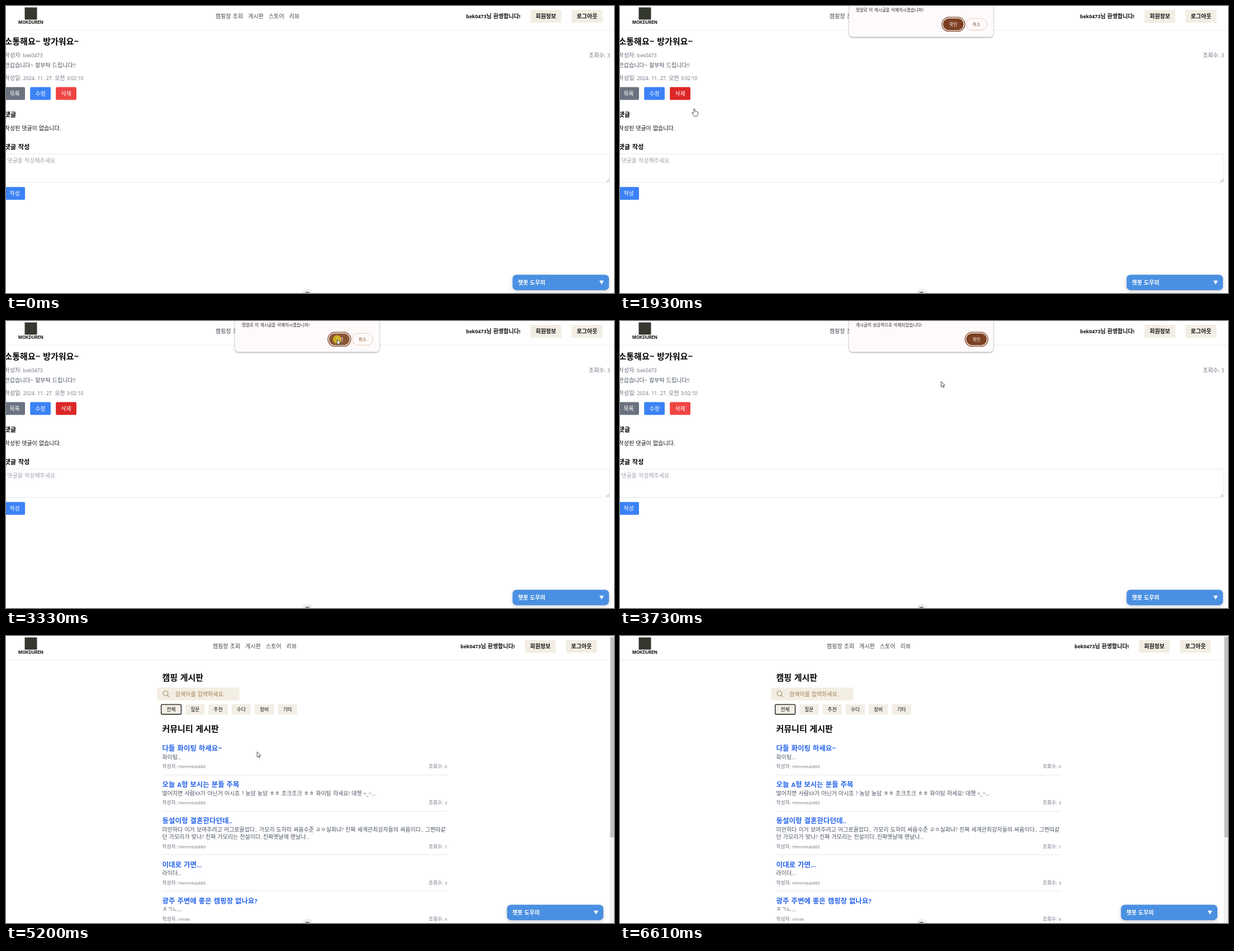
These frames come from a looping animation (1088x515 px, 7.4 s). An HTML page:

```html
<!DOCTYPE html>
<html lang="ko">
<head>
<meta charset="utf-8">
<title>캠핑 게시판</title>
<style>
html, body { margin: 0; width: 100%; height: 100%; overflow: hidden; background: #fff; }
svg { display: block; width: 1088px; height: 515px; }
text { font-family: 'Noto Sans CJK KR', 'Noto Sans CJK JP', sans-serif; word-spacing: .03em; white-space: pre; }
tspan { font-family: 'Open Sans', 'Noto Sans', sans-serif; font-size: .88em; }
.b { font-weight: 700; }
.m { text-anchor: middle; }
.e { text-anchor: end; }
.logo { font: 700 7.6px Inter, sans-serif; }
.card { filter: drop-shadow(0 1px 1.5px rgba(0, 0, 0, .4)); }
.chat { filter: drop-shadow(0 2px 3px rgba(0, 0, 0, .2)); }
</style>
</head>
<body>
<svg id="stage" viewBox="0 0 1088 515"></svg>
<script>
const DURATION = 7400;
const USER = 'bek0473', WRITER = 'hhmmtub683';
const INK = '#111', BODY = '#4b5563', MUTED = '#6b7280', SAND = '#f3eee4', BLUE = '#3b82f6';
const BROWN = '#7d4022', BROWN_HOVER = '#8b5636';
const LEFT = -2.5, RIGHT = 1081, COLUMN = 279.5, COLUMN_END = 789.5;

// cy is the vertical middle of the line; Latin runs get their own face.
const text = (x, cy, s, size = 10, fill = INK, cls = '') =>
  `<text x="${x}" y="${cy + size * .37}" font-size="${size}" fill="${fill}" class="${cls}">` +
  s.replace(/[!-}]+/g, '<tspan>$&</tspan>') + '</text>';
const heading = (x, cy, s, size = 15, fill = '#000') => text(x, cy, s, size, fill, 'b');
const rect = (x, y, w, h, fill, r = 0, extra = '') =>
  `<rect x="${x}" y="${y}" width="${w}" height="${h}" rx="${r}" fill="${fill}" ${extra}/>`;
const line = (x1, x2, y, color) => `<path d="M${x1} ${y}H${x2}" stroke="${color}"/>`;
const button = (col, y, label, fill, id = 'b' + y + col) => {
  const x = LEFT - .3 + col * 46;
  return rect(x, y, 36.8, 23, fill, 2, `id="${id}"`) + text(x + 18.4, y + 11.5, label, 10, '#fff', 'm');
};

// The scrollbar narrows the layout: centred parts move by half of it.
function frame(bar) {
  const end = 1088 - bar;
  return line(0, end, 43.5, '#efefef') +
    rect(33.5, 2.5, 22, 22, '#34382f') +
    '<text x="44.5" y="31.5" class="logo m" fill="#111">MOKDUREN</text>' +
    text(375 - bar / 2, 18.5, '캠핑장 조회', 10, '#3f444c') +
    ['게시판', '스토어', '리뷰'].map((s, i) =>
      text(433.3 + 36.7 * i - bar / 2, 18.5, s, 10, '#3f444c')).join('') +
    text(end - 167.5, 18.5, USER + '님 환영합니다!', 10, INK, 'b e') +
    ['회원정보', '로그아웃'].map((s, i) => {
      const x = end - 149.5 + i * 73.6;
      return rect(x, 7, 55.2, 23, SAND, 1) + text(x + 27.6, 18.5, s, 10, INK, 'b m');
    }).join('') +
    rect(end - 181.5, 482.3, 172.5, 27.6, '#4a90e2', 7, 'class="chat"') +
    heading(end - 172, 496, '챗봇 도우미', 10, '#fff') +
    `<path d="M${end - 26.2} 492.8h8l-4 7z" fill="#fff"/>`;
}

function detailPage() {
  return frame(0) +
    heading(LEFT, 63, '소통해요~ 방가워요~') +
    text(LEFT, 88, '작성자: ' + USER, 10, MUTED) +
    text(RIGHT, 88, '조회수: 3', 10, MUTED, 'e') +
    text(LEFT, 106.3, '반갑습니다~ 잘부탁 드립니다!!', 10, BODY) +
    text(LEFT, 129.3, '작성일: 2024. 11. 27. 오전 3:02:10', 10, MUTED) +
    button(0, 145.5, '목록', MUTED) +
    button(1, 145.5, '수정', BLUE) +
    button(2, 145.5, '삭제', '#ef4444', 'remove') +
    heading(LEFT, 195, '댓글', 11.25) +
    text(LEFT, 219, '작성된 댓글이 없습니다.') +
    heading(LEFT, 252.5, '댓글 작성', 11.25) +
    rect(LEFT, 265.5, RIGHT - LEFT - .5, 51, '#fff', 2, 'stroke="#e8eaed"') +
    '<path d="M1074.5 315.5l5-5M1077.5 315.5l2-2" stroke="#777" stroke-width=".8"/>' +
    text(2.3, 277, '댓글을 작성해주세요', 10, '#9ca3af') +
    button(0, 324.7, '작성', BLUE);
}

function postList() {
  const posts = [
    ['다들 화이팅 하세요~', 0, ['화이팅...']],
    ['오늘 A형 보시는 분들 주목', 3, ['떨어지면 사람XX가 아닌거 아시죠 ? 농담 농담 ㅎㅎ 조크조크 ㅎㅎ 화이팅 하세요! 데헷 &gt;_~...']],
    ['동설이형 결혼한다던데..', 1, [
      '미안하다 이거 보여주려고 어그로끌었다.. 가모리 도하미 싸움수준 ㄹㅇ실화냐? 진짜 세계관최강자들의 싸움이다.. 그찐따같',
      '던 가모리가 맞나? 진짜 가모리는 전설이다..진짜옛날에 맨날나...']],
    ['이대로 가면...', 3, ['라이더...']],
    ['광주 주변에 좋은 캠핑장 없나요?', 4, ['ㅈㄱㄴ...'], 'rimek']
  ];
  const leading = 13.8;
  let y = 201.5;
  return posts.map(([title, views, body, author = WRITER]) => {
    const top = y, foot = top + 18.8 + body.length * leading;
    y = foot + 32.4;
    return heading(COLUMN, top, title, 12.5, '#2563eb') +
      body.map((s, i) => text(COLUMN, top + 15.3 + i * leading, s, 10, BODY)).join('') +
      text(COLUMN, foot, '작성자: ' + author, 8.75, MUTED) +
      text(COLUMN_END, foot, '조회수: ' + views, 8.75, MUTED, 'e') +
      line(COLUMN, COLUMN_END, Math.floor(foot + 15) + .5, '#e5e7eb');
  }).join('');
}

function listPage() {
  const tags = ['질문', '추천', '수다', '장비', '기타'];
  return rect(0, 0, 1088, 515, '#fff') + frame(10) +
    rect(1080.5, 0, 7.5, 515, '#f1f1f1') + rect(1081.5, 2, 6.5, 359.5, '#c1c1c1') +
    heading(COLUMN, 74.5, '캠핑 게시판') +
    rect(270.5, 92.5, 147, 23, SAND, 2) +
    '<g fill="none" stroke="#8f6f4a"><circle cx="285.5" cy="103" r="4.4"/><path d="M288.7 106.2l3.6 3.6"/></g>' +
    text(302.8, 104, '검색어를 입력하세요.', 10, '#a07e4c') +
    rect(277.7, 122.9, 35.8, 17.6, SAND, 2, 'stroke="#111" stroke-width="1.3"') +
    text(295.5, 131.8, '전체', 8.75, INK, 'm') +
    tags.map((s, i) => rect(321 + i * 41.35, 122.5, 34.6, 18.5, SAND, 2) +
      text(338.3 + i * 41.35, 131.8, s, 8.75, INK, 'm')).join('') +
    heading(COLUMN, 166.5, '커뮤니티 게시판') +
    postList();
}

const card = message => rect(410, -30, 258, 85.5, '#fefafc', 6, 'class="card"') +
  text(422, 7, message, 7.6, '#2b2422');
const pill = (x, id) =>
  rect(x - 2, 20.2, 41, 25.2, '#fff', 12.6, `id="${id}Ring" stroke="${BROWN}" stroke-width="1.3"`) +
  rect(x, 22.2, 37, 21.2, BROWN, 10.6, `id="${id}"`) +
  text(x + 18.5, 32.8, '확인', 7.6, '#fff', 'm');

document.getElementById('stage').innerHTML = `
  <g>${detailPage()}</g>
  <g id="list">${listPage()}</g>
  <circle cx="540" cy="517" r="10" fill="#f0f0f0"/>
  <path d="M535.5 513.5h7.5M537 515h5" stroke="#555" stroke-width="1.2"/>
  <g id="ask">${card('정말로 이 게시글을 삭제하시겠습니까?')}
    ${pill(578, 'yes')}
    ${rect(619.5, 22.2, 37, 21.2, '#fffafa', 10.6, 'stroke="#ecc9b4"')}
    ${text(638, 32.8, '취소', 7.6, '#85502f', 'm')}</g>
  <g id="done">${card('게시글이 성공적으로 삭제되었습니다!')}
    ${pill(619.5, 'ok')}</g>
  <g id="cursor">
    <circle id="press" r="7.5" fill="#dccb1c" opacity=".75"/>
    <g fill="#fff" stroke="#222" stroke-width=".8">
      <path id="arrow" d="M0 0V9.6L2.2 7.6 3.8 11 5.3 10.3 3.8 7H6.8Z"/>
      <path id="hand" d="M-1.2 8V1Q0-.8 1.2 1V5Q2.5 4 3.3 5.3 4.6 4.6 5.2 5.9 6.4 5.5 6.4 7V10Q6 12 5 13.6H-.6Q-1.5 11.5-4.2 8.6-4.6 6.8-2.8 7.2Z"/>
    </g>
  </g>`;

const $ = id => document.getElementById(id);
const clamp = v => Math.max(0, Math.min(1, v));
const easeOut = k => 1 - (1 - k) ** 3;
const show = (id, on) => { $(id).style.display = on ? '' : 'none'; };

// Where the pointer rests or turns.
const stops = [
  { at: 70, x: 1035, y: 508 },
  { at: 800, until: 1700, x: 108, y: 158 },
  { at: 1930, x: 130.5, y: 185 },
  { at: 2390, x: 516, y: 47 },
  { at: 3060, until: 3400, x: 592.5, y: 33 },
  { at: 3730, x: 574, y: 109.5 },
  { at: 4000, until: 4500, x: 645, y: 36 },
  { at: 4870, until: 5130, x: 453, y: 198 },
  { at: 5200, x: 449, y: 206 },
  { at: 5400, x: 470, y: 325 },
  { at: 5650, x: 400, y: 60 },
  { at: 5930, until: 6000, x: 145, y: 150 },
  { at: 6610, x: 1078, y: 508 }
];
function pointer(t) {
  const i = stops.findIndex(s => s.at > t);
  const a = stops[i - 1], b = stops[i], start = a.until || a.at;
  const k = easeOut(clamp((t - start) / (b.at - start)));
  return [a.x + (b.x - a.x) * k, a.y + (b.y - a.y) * k];
}

// Fades and slides a dialog in at t0 and out at t1.
function dialog(id, t, t0, t1) {
  const enter = clamp((t - t0) / 100), leave = clamp((t - t1) / 120);
  show(id, enter > 0 && leave < 1);
  $(id).setAttribute('opacity', leave ? 1 - leave * .5 : enter);
  $(id).setAttribute('transform', `translate(0 ${-6 * (1 - enter) - 16 * leave})`);
}

function render(t) {
  show('list', t >= 4400);
  $('remove').setAttribute('fill', t > 790 && t < 3480 ? '#dc2626' : '#ef4444');
  dialog('ask', t, 1760, 3400);
  dialog('done', t, 3560, 4440);
  $('yes').setAttribute('fill', t > 2860 ? BROWN_HOVER : BROWN);
  $('ok').setAttribute('fill', t > 3960 ? BROWN_HOVER : BROWN);
  show('okRing', t < 4400);

  const visible = t >= 70 && t < 6610;
  show('cursor', visible);
  if (!visible) return;
  const [x, y] = pointer(t);
  $('cursor').setAttribute('transform', `translate(${x} ${y})`);
  const hand = t >= 830 && t < 2040;
  show('hand', hand);
  show('arrow', !hand);
  show('press', [1600, 3200, 4200].some(c => t >= c && t < c + 190));
}

function tick() {
  render(performance.now() % DURATION);
  requestAnimationFrame(tick);
}
tick();
</script>
</body>
</html>
```
